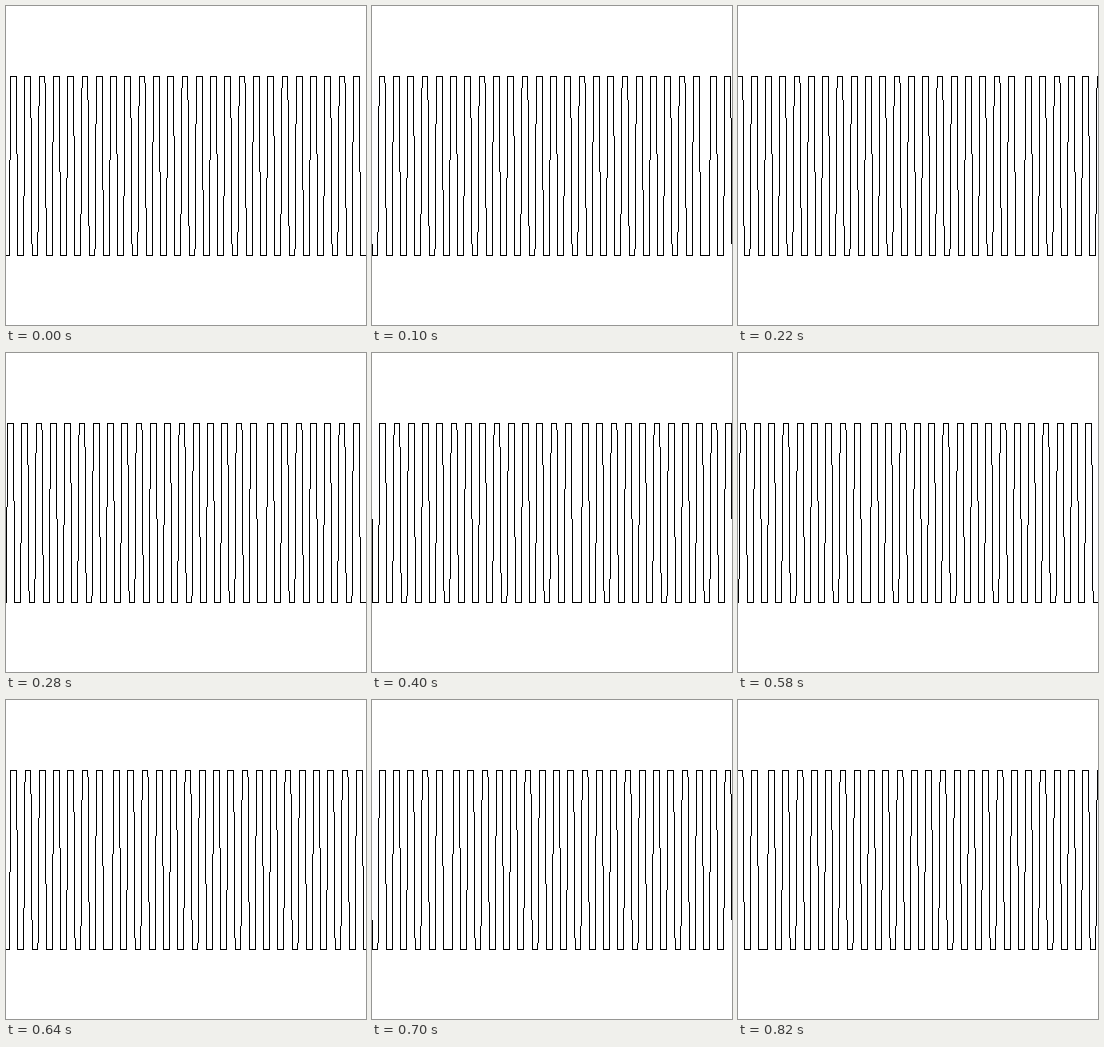
Recreate the animation shown at these times as an HTML page with a canvas. Size 360 px wide and 319 px high, loop 0.88 s.

```html
<!DOCTYPE html>
<html lang="en">
<head>
<meta charset="utf-8">
<title>Scrolling square wave</title>
<style>
  html, body { margin: 0; height: 100%; overflow: hidden; background: #fff; }
  canvas { display: block; }
</style>
</head>
<body>
<canvas id="stage" width="360" height="319"></canvas>
<script>
const ctx = document.getElementById('stage').getContext('2d');
const WIDTH = 360, HEIGHT = 319, TOP = 70, BOTTOM = 249;
const SAMPLES = 252, SPACING = WIDTH / SAMPLES, OFFSET = 0.38;
const LOOP = 880, FIRST = 100, STEP = 60, STEPS = 14;

// 25 periods of ten samples, then two extra low samples
function level(i) {
  const phase = i % 10;
  return i < 250 && phase > 2 && phase < 8 ? TOP : BOTTOM;
}

// Whole pixels keep the line free of antialiasing
function plot(x, y) {
  ctx.fillRect((Math.floor(x) + WIDTH) % WIDTH, y, 1, 1);
}

// The wave rolls left by whole pixels and wraps at the edges
function draw(step) {
  const roll = Math.round(step * WIDTH / STEPS);
  ctx.fillStyle = '#fff';
  ctx.fillRect(0, 0, WIDTH, HEIGHT);
  ctx.fillStyle = '#000';
  for (let i = 0; i < SAMPLES; i++) {
    const x = i * SPACING + OFFSET - roll;
    const from = level(i), to = level((i + 1) % SAMPLES);
    const count = Math.abs(to - from) || 3;
    for (let n = 0; n <= count; n++) {
      const f = n / count;
      plot(x + f * SPACING, Math.round(from + f * (to - from)));
    }
  }
}

let shown = -1;
function tick() {
  const t = performance.now() % LOOP;
  const step = t < FIRST ? 0 : 1 + Math.floor((t - FIRST) / STEP);
  if (step !== shown) draw(shown = step);
  requestAnimationFrame(tick);
}
tick();
</script>
</body>
</html>
```
